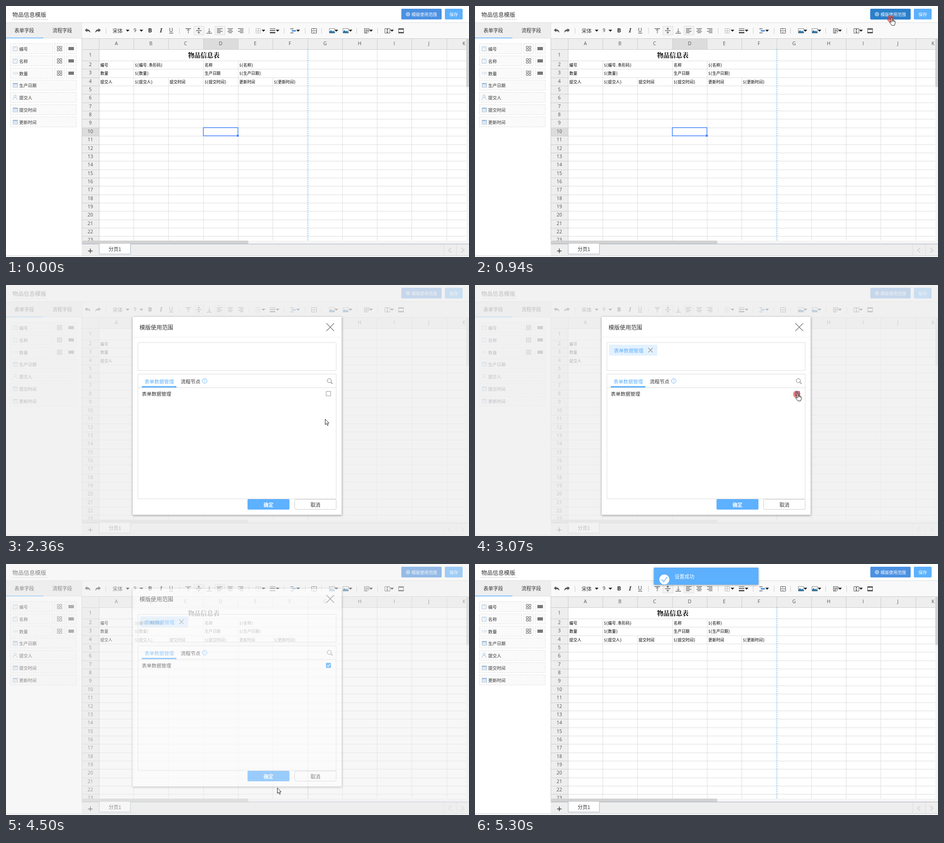
Animation, 1016 px wide and 551 px high, one loop 6.01 s. Source, as an HTML page with a canvas:

```html
<!DOCTYPE html>
<html lang="zh-CN">
<head>
<meta charset="utf-8">
<style>
html, body { margin: 0; width: 100%; height: 100%; overflow: hidden; background: #fff; }
canvas { display: block; }
</style>
</head>
<body>
<canvas id="stage" width="1016" height="551"></canvas>
<script>
const W = 1016, H = 551, LOOP = 6010;
const SANS = '"Noto Sans CJK SC","Noto Sans CJK",sans-serif';
const MONO = '"Noto Sans Mono CJK SC","Noto Sans CJK SC",monospace';
const SERIF = '"Noto Serif CJK SC","Noto Sans CJK SC",serif';
const LATIN = '"Open Sans","Noto Sans",sans-serif';
const BLUE = '#4a90e2', SKY = '#5eb1ff', INK = '#333', ICON = '#555', FIELD = '#a3bfdd', PICK = '#4b89ff';

const screen = document.getElementById('stage').getContext('2d');
let g = screen;

// Drawing helpers
function text(s, x, y, size, color = INK, align = 'left', family = SANS, style = '') {
  g.font = `${style} ${size}px ${family}`;
  g.textAlign = align;
  g.textBaseline = 'middle';
  g.fillStyle = color;
  g.fillText(s, x, y);
}
function fill(x, y, w, h, color, r = 0) {
  g.fillStyle = color;
  g.beginPath();
  g.roundRect(x, y, w, h, r);
  g.fill();
}
function frame(x, y, w, h, color, r = 0, dash = []) {
  g.strokeStyle = color;
  g.lineWidth = 1;
  g.setLineDash(dash);
  g.beginPath();
  g.roundRect(x + .5, y + .5, w - 1, h - 1, r);
  g.stroke();
  g.setLineDash([]);
}
function line(points, color, width = 1, dash = []) {
  g.strokeStyle = color;
  g.lineWidth = width;
  g.setLineDash(dash);
  g.beginPath();
  for (let i = 0; i < points.length; i += 2) g.lineTo(points[i], points[i + 1]);
  g.stroke();
  g.setLineDash([]);
}
const hline = (x1, x2, y, color, dash) => line([x1, y + .5, x2, y + .5], color, 1, dash);
const vline = (x, y1, y2, color, dash) => line([x + .5, y1, x + .5, y2], color, 1, dash);
function shape(path, x, y, color) {
  g.save();
  g.translate(x, y);
  g.fillStyle = color;
  g.fill(new Path2D(path));
  g.restore();
}
function circle(x, y, r, color, filled) {
  g.beginPath();
  g.arc(x, y, r, 0, 7);
  g.lineWidth = 1;
  g.fillStyle = g.strokeStyle = color;
  filled ? g.fill() : g.stroke();
}
function cross(x, y, r, color, width) {
  line([x - r, y - r, x + r, y + r], color, width);
  line([x - r, y + r, x + r, y - r], color, width);
}
function layer(draw) {
  const c = document.createElement('canvas');
  c.width = W;
  c.height = H;
  g = c.getContext('2d');
  draw();
  g = screen;
  return c;
}

function scopeButton(color) {
  fill(867.5, 6, 88.5, 23.5, color, 2);
  circle(882, 18, 4, '#fff');
  circle(882, 18, 1.7, '#fff');
  text('模版使用范围', 890, 18.5, 9.3, '#fff');
}

function header() {
  text('物品信息模版', 14, 19.5, 12.4);
  hline(13, 92, 29, '#aaa', [2, 2]);
  scopeButton(BLUE);
  fill(963, 6, 39, 23.5, '#5cb0fd', 2);
  text('保存', 982.5, 18.5, 9.5, '#fff', 'center');
  hline(0, W, 36, '#ddd');
}

function calendarIcon(y) {
  frame(15, y - 5, 11, 10, FIELD);
  fill(15, y - 4, 11, 2, FIELD);
  for (let i = 0; i < 6; i++) fill(17 + i % 3 * 3, y - 1 + (i > 2) * 2.5, 1.5, 1.5, FIELD);
}
function sidebar() {
  fill(0, 37, 166, H - 39, '#fff');
  fill(0, 37, 166, 34, '#eee');
  hline(82, 166, 70, '#ddd');
  fill(0, 69.5, 82, 1.5, SKY);
  text('表单字段', 40, 54, 10.8, INK, 'center');
  text('流程字段', 123.5, 54, 10.8, INK, 'center');
  ['编号', '名称', '数量', '生产日期', '提交人', '提交时间', '更新时间'].forEach((name, i) => {
    const top = Math.round(82 + i * 26.75), mid = top + 12;
    const boxes = i < 3 ? [[9, 94], [106, 23], [132, 23]] : [[9, 146]];
    for (const [x, w] of boxes) {
      fill(x, top, w, 23, '#fafafa');
      frame(x, top, w, 23, '#ddd', 0, [3, 2]);
    }
    if (i < 2) {
      frame(15, mid - 5, 10, 10, FIELD);
      text('T', 20, mid + .5, 7, FIELD, 'center', LATIN);
    } else if (i == 2) {
      text('123', 20, mid, 7, FIELD, 'center', LATIN);
    } else if (i == 4) {
      circle(20, mid - 3, 2.5, FIELD);
      line([15.5, mid + 5, 16, mid + 2, 18.5, mid, 21.5, mid, 24, mid + 2, 24.5, mid + 5], FIELD);
    } else calendarIcon(mid);
    if (i < 3) {
      for (const [dx, dy] of [[0, 0], [6, 0], [0, 6], [6, 6]]) frame(112 + dx, mid - 6 + dy, 5, 5, '#666');
      fill(137, mid - 4, 12, 7, '#777');
    }
    text(name, 29, mid + .5, 9.5);
  });
}

const caret = x => shape('M-4-2H4L0 2.5Z', x, 54, '#222');
function stripes(x, y, widths, align, step = 3) {
  widths.forEach((w, i) => fill(x + (12 - w) * align, y + i * step, w, 1.2, ICON));
}
function toolbar() {
  fill(166, 37, W - 166, 34, '#f9f9f9');
  vline(166, 37, 71, '#e5e5e5');
  for (const x of [219, 380, 533, 610, 656, 692, 769, 815]) vline(x, 48, 61, '#ccc');
  const undo = 'M-6-1L-1-5V-2.5C4-2.5 6 0 6 5C4 1.5 2 1 -1 1V3.5Z';
  shape(undo, 179, 54, ICON);
  g.save();
  g.translate(202, 54);
  g.scale(-1, 1);
  shape(undo, 0, 0, ICON);
  g.restore();
  text('宋体', 234, 54.5, 11);
  text('9', 283, 54.5, 10.5, INK, 'center', LATIN);
  [267, 297, 565, 596, 641, 725, 756, 801, 847].forEach(caret);
  text('B', 316, 54.5, 13, INK, 'center', LATIN, 'bold');
  text('I', 340, 54.5, 13, INK, 'center', '"Noto Serif",serif', 'italic bold');
  text('U', 362, 53.5, 12, INK, 'center', LATIN);
  hline(358, 367, 59, INK);

  for (const x of [412, 458]) {
    fill(x, 44, 23, 20, '#f3f3f3');
    frame(x, 44, 23, 20, '#ddd');
  }
  fill(394, 49, 12, 1.3, ICON);
  vline(399.5, 51, 60, ICON);
  line([397, 54, 400, 51, 403, 54], ICON);
  fill(417, 53.5, 12, 1.3, ICON);
  shape('M-3-5H3L0-2ZM-3 5H3L0 2ZM-.5-7H.5V-4H-.5ZM-.5 4H.5V7H-.5Z', 423, 54, ICON);
  fill(440, 59, 12, 1.3, ICON);
  vline(445.5, 49, 58, ICON);
  line([443, 55, 446, 58, 449, 55], ICON);
  [463, 486, 509].forEach((x, i) => stripes(x, 49, [12, 8, 12, 8], i / 2));

  frame(548, 49, 11, 11, '#bbb');
  vline(553, 49, 60, '#bbb');
  hline(548, 559, 54, '#bbb');
  fill(579, 49, 12, 1, ICON);
  fill(579, 52.5, 12, 2, ICON);
  fill(579, 57, 12, 3, ICON);
  fill(624, 49, 7, 2, '#888');
  fill(627, 53, 9, 3, BLUE);
  fill(624, 58, 7, 2, '#888');
  frame(670, 49, 12, 11, ICON);
  hline(670, 682, 54, ICON);
  vline(675, 49, 52, ICON);
  vline(675, 57, 60, ICON);
  for (const x of [709, 739]) {
    frame(x, 49, 13, 11, '#888');
    shape('M0 8V5L3 2L6 5L8 3L11 6V8Z', x + 1, 51, '#2478ae');
  }
  line([786.5, 49.5, 796.5, 49.5, 796.5, 56, 793, 59.5, 786.5, 59.5, 786.5, 49], ICON);
  stripes(788, 52, [7, 7, 4], 0, 2.5);
  frame(831, 49, 12, 11, ICON);
  vline(836, 51, 58, ICON);
  shape('M-2.5-2H2.5L0-4.5ZM-2.5 2H2.5L0 4.5Z', 837, 54.5, ICON);
  frame(861, 49, 12, 11, ICON);
  fill(861, 49, 12, 3, ICON);
  fill(861, 57, 12, 3, ICON);
}

const colX = i => Math.round(203.9 + 76.27 * i);
const rowY = r => r < 2 ? 95 : Math.round(120 + 18.35 * (r - 2));
function sheet(selected) {
  const GRID = '#ddd', EDGE = '#ccc';
  g.save();
  g.beginPath();
  g.rect(166, 71, 844, 444);
  g.clip();
  fill(166, 71, 844, 24, '#eee');
  fill(166, 95, 38, 420, '#eee');
  if (selected) {
    fill(colX(3), 71, 77, 24, '#dcdcdc');
    fill(166, rowY(10), 38, 19, '#dcdcdc');
  }
  for (let i = 0; i < 11; i++) {
    // Merged cells interrupt the upper part of some column lines
    const from = { 1: 120, 2: 157, 3: 120, 4: 120, 5: 157 }[i] || 95;
    vline(colX(i), 71, 95, EDGE);
    vline(colX(i), from, 515, GRID);
    text('ABCDEFGHIJK'[i], colX(i) + 38, 83.5, 10.5, ICON, 'center', LATIN);
  }
  for (let r = 1; r < 24; r++) {
    hline(166, 204, rowY(r), EDGE);
    hline(204, 1010, rowY(r), GRID);
    text(r, 185, r == 1 ? 108 : rowY(r) + 9.5, 10.5, ICON, 'center', LATIN);
  }
  hline(166, 1010, 71, EDGE);
  hline(166, 1010, 95, EDGE);
  vline(166, 71, 515, EDGE);
  vline(204, 71, 515, EDGE);
  vline(662, 95, 515, '#fff');
  vline(662, 95, 515, '#58aee8', [3.05, 1.53]);

  text('物品信息表', 434, 107.5, 13.8, '#000', 'center', SERIF, 'bold');
  [
    ['编号', '${编号.条形码}', '', '名称', '${名称}'],
    ['数量', '${数量}', '', '生产日期', '${生产日期}'],
    ['提交人', '${提交人}', '提交时间', '${提交时间}', '更新时间', '${更新时间}'],
  ].forEach((row, r) => row.forEach((s, c) =>
    text(s, colX(c) + 3, 129.5 + r * 18.35, 8.7, '#000', 'left', MONO)));

  if (selected) {
    g.strokeStyle = PICK;
    g.lineWidth = 1.6;
    g.strokeRect(433, 267, 76, 18);
    fill(505, 281, 7, 7, '#fff');
    fill(506, 282, 5, 5, PICK);
  }
  g.restore();

  fill(1010, 71, 6, 444, '#f5f5f5');
  fill(1010, 71, 6, 107, '#d2d2d2', 2);
  fill(166, 515, 850, 7, '#f5f5f5');
  fill(166, 515, 366, 7, '#d2d2d2', 3);
  fill(166, 522, 850, 27, '#eee');
  hline(166, W, 522, '#a3b1c2');
  fill(205, 522, 68, 22.5, '#fff');
  line([204.5, 522, 204.5, 544.5, 273, 544.5, 273, 522], '#a3b1c2');
  text('分页1', 239, 534, 10.8, INK, 'center');
  fill(180, 537, 10, 1.4, INK);
  fill(184.3, 532.5, 1.4, 10, INK);
  vline(960, 523, 549, '#ddd');
  vline(988, 523, 549, '#ddd');
  line([977, 531, 971, 536, 977, 541], '#ccc', 1.4);
  line([999, 531, 1005, 536, 999, 541], '#ccc', 1.4);
  hline(0, W, 548, '#ccc');
}

function page(selected) {
  fill(0, 0, W, H, '#fff');
  header();
  sidebar();
  toolbar();
  sheet(selected);
}

function withShadow(draw) {
  g.save();
  g.shadowColor = 'rgba(0,0,0,.35)';
  g.shadowBlur = 5;
  g.shadowOffsetY = 1;
  draw();
  g.restore();
}

function dialog(checked) {
  withShadow(() => fill(278, 70, 458.5, 434.5, '#fff'));
  text('模版使用范围', 293, 93, 12.3);
  cross(711.5, 92.5, 8.5, '#777', 1.3);
  hline(278, 736, 114, '#eee');
  frame(289, 126, 436, 62, '#ddd');
  frame(289, 195, 436, 275, '#ddd');
  hline(290, 724, 225, '#ddd');
  text('表单数据管理', 304, 211.5, 10.75, SKY);
  fill(298, 222, 76, 3, SKY);
  text('流程节点', 383.5, 211.5, 10.75);
  circle(436, 210.5, 5, SKY);
  text('?', 436, 211, 8, SKY, 'center', LATIN);
  circle(709.5, 210, 4.5, '#777');
  line([712.5, 213, 716.5, 217], '#777', 1.2);
  text('表单数据管理', 298, 238.5, 10.75);
  if (checked) {
    fill(702, 233, 11, 11, '#3ba0fb', 1);
    line([704.5, 238.5, 707, 241, 711, 236], '#fff', 1.5);
    fill(294, 131, 106, 24, '#e3f1ff', 2);
    text('表单数据管理', 305, 144, 10.75, SKY);
    cross(385, 143, 4.8, '#888', 1.2);
  } else frame(702, 233, 11, 11, '#999');
  fill(530, 470, 92, 23, SKY, 2);
  text('确定', 576, 482.5, 10.8, '#fff', 'center', SANS, 'bold');
  frame(633, 470, 92, 23, '#ccc', 2);
  text('取消', 679, 482.5, 10.8, INK, 'center');
}

function toast(top) {
  withShadow(() => fill(392.5, top, 229.5, 37.5, '#5cb0fd', 1));
  circle(415.5, top + 26, 11, '#fff', true);
  line([409.5, top + 26, 414, top + 31, 422, top + 20.5], SKY, 1.4);
  text('设置成功', 438, top + 19.5, 10.8, '#fff');
}

const ARROW = new Path2D('M.5.5V12.5L3.2 10L5.2 14.5L7.2 13.6L5.3 9.2H8.8Z');
const HAND = new Path2D('M1 1.5Q1-.3 2.2-.3Q3.5-.3 3.5 1.5V6Q5 5 6 6.3Q7.5 5.5 8.3 7Q10 6.5 10 8.5V12L8.5 16.5H2.5L-2 10.5Q-2.8 9 -1.2 8.7L1 10.5Z');

// Cursor stops: time, x, y
const path = [
  [150, 640, 556], [780, 912, 26], [1880, 912, 26], [2360, 700, 294], [2520, 700, 294],
  [2840, 706, 238], [3390, 706, 238], [3870, 595, 491], [4500, 595, 491],
  [4660, 589, 484], [4983, 589, 484], [5300, 575, 556],
];
const within = (t, a, b) => t >= a && t < b;
const clamp = v => Math.min(1, Math.max(0, v));

function cursor(t) {
  const i = path.findIndex(stop => stop[0] > t);
  if (i < 1) return;
  const [t0, x0, y0] = path[i - 1], [t1, x1, y1] = path[i];
  const u = (t - t0) / (t1 - t0), e = u * u * (3 - 2 * u);
  const hand = within(t, 770, 1400) || within(t, 2760, 3450) || within(t, 3780, 4500);
  g.save();
  g.translate(Math.round(x0 + (x1 - x0) * e), Math.round(y0 + (y1 - y0) * e));
  if (within(t, 850, 1090) || within(t, 2990, 3230) || within(t, 4100, 4340))
    circle(0, 2, 8, 'rgba(225,60,40,.6)', true);
  g.fillStyle = '#fff';
  g.strokeStyle = '#222';
  g.lineWidth = 1;
  g.fill(hand ? HAND : ARROW);
  g.stroke(hand ? HAND : ARROW);
  if (hand) for (const x of [3.5, 6, 8.3]) line([x, 6, x, 9], '#222', .8);
  g.restore();
}

const pages = [false, true].map(s => layer(() => page(s)));
const dialogs = [false, true].map(c => layer(() => dialog(c)));

function render(t) {
  g.drawImage(pages[+(t < 1400)], 0, 0);
  if (within(t, 770, 1400)) scopeButton('#2a7fcb');

  if (within(t, 1400, 4660)) {
    const closing = t >= 4500;
    const alpha = closing ? clamp(.6 - (t - 4508) / 200) : clamp((t - 1330) / 280);
    const shift = closing ? 40 * (1 - alpha) : 109 * (1 - clamp((t - 1405) / 310)) ** 1.25;
    g.globalAlpha = alpha;
    fill(0, 0, W, H, 'rgba(238,238,238,.75)');
    g.drawImage(dialogs[+(t >= 3070)], 0, -Math.round(shift));
    g.globalAlpha = 1;
  }
  if (t >= 4740) toast(8 - Math.round(46 * (1 - clamp((t - 4700) / 240)) ** 2));
  cursor(t);
}

// The screen advances in steps of about 79 ms
const STEP = 79.4, FIRST = 220;
function tick(now) {
  const t = now % LOOP;
  render(t < FIRST ? 0 : FIRST + STEP * Math.floor((t - FIRST) / STEP + .15));
  requestAnimationFrame(tick);
}
requestAnimationFrame(tick);
</script>
</body>
</html>
```
